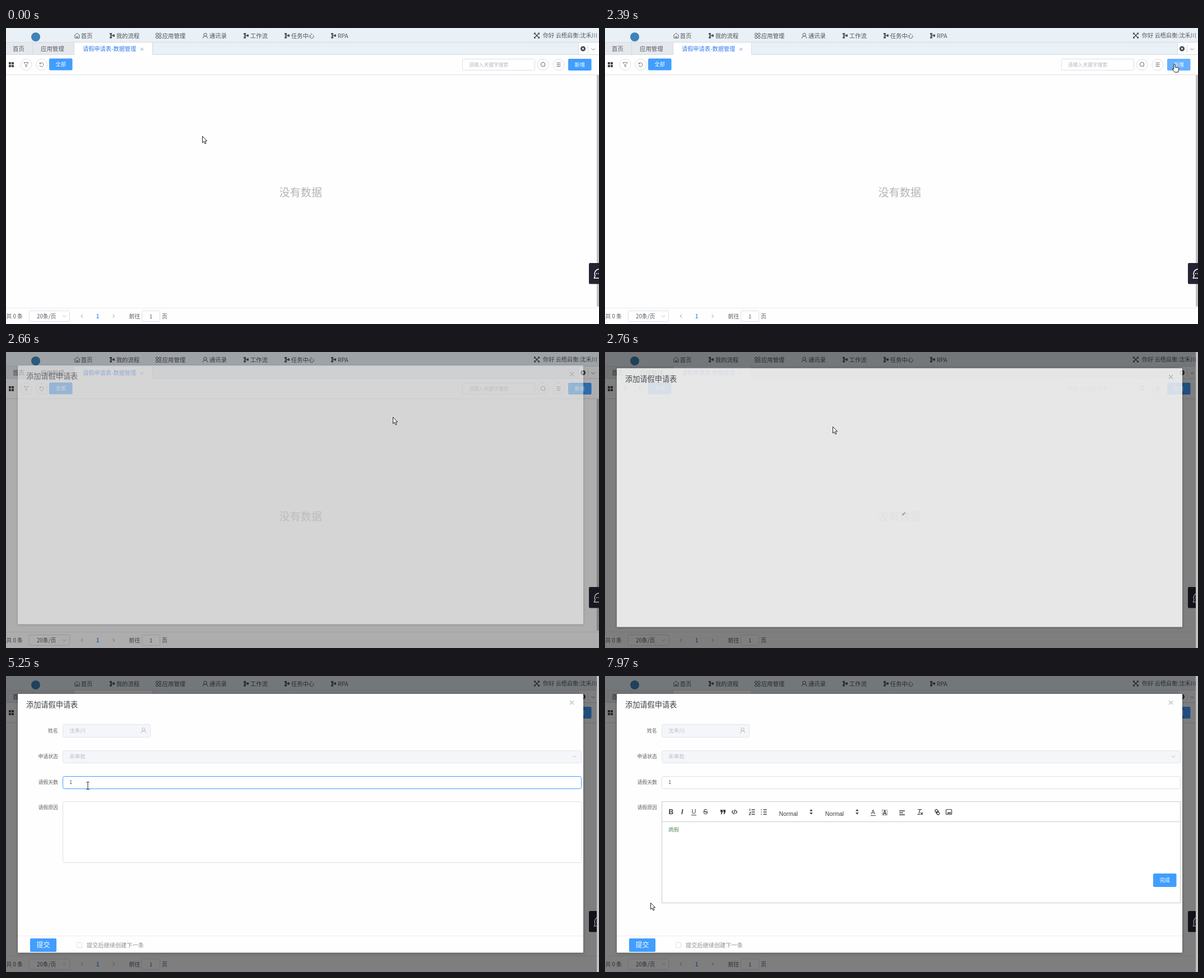
Recreate the animation shown at these times as an HTML page. Size 1058x529 px, loop 8 s.

```html
<!DOCTYPE html>
<html lang="zh-CN">
<head>
<meta charset="utf-8">
<title>请假申请表</title>
<style>
html, body { margin: 0; width: 100%; height: 100%; overflow: hidden; background: #fefefe; }
svg { display: block; width: 1058px; height: 529px; }
text { font-family: "Noto Sans CJK SC", "Noto Sans CJK JP", "Noto Sans CJK", sans-serif; white-space: pre; }
.latin { font-family: "Liberation Sans", Arial, sans-serif; }
.mono { font-family: "Liberation Mono", "Noto Sans CJK SC", "Noto Sans CJK JP", monospace; }
.item { color: #4f545c; }
.item .bg { fill: none; }
.item.on { color: #2f7bf0; }
.item.on .bg { fill: #f4f8fb; }
</style>
</head>
<body>
<svg id="stage" viewBox="0 0 1058 529"></svg>
<script>
const LOOP = 8000, BLUE = '#409eff', LINE = '#dcdfe6', INK = '#555a61';
const USER = '沈禾川', COMPANY = '云梧启衡';

// ---- drawing helpers
const text = (x, mid, str, size = 10.4, fill = INK, more = '') =>
  `<text x="${x}" y="${mid + size * .36}" font-size="${size}" fill="${fill}" ${more}>${str}</text>`;
const latin = (x, mid, str, size, fill, more = '') => text(x, mid, str, size, fill, `class="latin" ${more}`);
const rect = (x, y, w, h, fill, more = '') =>
  `<rect x="${x}" y="${y}" width="${w}" height="${h}" fill="${fill}" ${more}/>`;
const box = (x, y, w, h, fill = '#fff', stroke = LINE, more = 'rx="3"') =>
  rect(x + .5, y + .5, w - 1, h - 1, fill, `stroke="${stroke}" ${more}`);
const path = (d, stroke = INK, width = 1, fill = 'none') =>
  `<path d="${d}" stroke="${stroke}" stroke-width="${width}" fill="${fill}"/>`;
const ring = (x, y, r, stroke = LINE, fill = 'none', width = 1) =>
  `<circle cx="${x}" cy="${y}" r="${r}" stroke="${stroke}" fill="${fill}" stroke-width="${width}"/>`;
const button = (x, y, w, h, str, size = 9.2, more = '') => rect(x, y, w, h, BLUE, `rx="2" ${more}`) +
  text(x + w / 2, y + h / 2, str, size, '#fff', 'text-anchor="middle" font-weight="500"');
const chevron = (x, y, c = '#b8bcc4') => path(`M${x - 3} ${y - 1.5}l3 3 3-3`, c);
const group = (id, body) => `<g id="${id}">${body}</g>`;

const icons = {
  home: x => path(`M${x} 13.5l5-4.3 5 4.3M${x + 1} 13v5h8v-5M${x + 4} 18v-3h2v3`, 'currentColor', .9),
  flow: x => path(`M${x} 9h4v3h-4zM${x + 1} 12.5h3v2.5h-3zM${x} 15.5h4v3h-4zM${x + 5.5} 11.5h3.5v4h-3.5zM${x + 3} 13h3v1h-3z`, 'none', 0, 'currentColor'),
  apps: x => [[0, 0], [5.4, 0], [0, 5.4], [5.4, 5.4]].map(([a, b]) => ring(x + 2.5 + a, 11.2 + b, 2.1, 'currentColor')).join(''),
  user: (x, y = 14, c = 'currentColor') => ring(x + 4.5, y - 2, 2.7, c) + path(`M${x} ${y + 4.5}q.5-4 4.5-4t4.5 4`, c)
};

// ---- page
const menu = [
  ['首页', 'home', 122, 106], ['我的流程', 'flow', 185, 169], ['应用管理', 'apps', 267, 253],
  ['通讯录', 'user', 351, 337], ['工作流', 'flow', 424, 409], ['任务中心', 'flow', 497, 483], ['RPA', 'flow', 580, 566]
];
const menuEnd = i => i < menu.length - 1 ? menu[i + 1][3] : 628;
const menuItem = ([label, icon, x, left], i) =>
  `<g class="item"><rect class="bg" x="${left}" y="0" width="${menuEnd(i) - left}" height="25"/>` +
  icons[icon](x) + text(x + 11.7, 14, label, 10.4, 'currentColor') + '</g>';

const expand = path('M942.5 9l9 9M951.5 9l-9 9', '#44484e', 1.3) +
  path('M942 8.5h3.5l-3.5 3.5zM952 8.5v3.5l-3.5-3.5zM942 18.5v-3.5l3.5 3.5zM952 18.5h-3.5l3.5-3.5z', 'none', 0, '#44484e');

const header = rect(0, 0, 1058, 48, '#e9f0f6') + ring(53, 16, 8, 'none', '#3f83b8') +
  menu.map(menuItem).join('') + expand +
  text(958, 13.5, `你好 ${COMPANY}:${USER}`, 10.2) +
  rect(0, 26, 122, 22, '#e5e9ee') + path('M0 25.5H1058M0 47.5H122M261 47.5H1058M47.5 26v22M121.5 26v22', '#d5dae1') +
  rect(122, 26, 139, 23, '#fff') + path('M261.5 26v22', '#d5dae1') +
  text(12, 37, '首页') + text(62, 37, '应用管理') + text(137, 37, '请假申请表-数据管理', 10.2, '#2f7bf0') +
  path('M240 35.5l5 5M245 35.5l-5 5', '#5b8fd8', .9) +
  rect(1021, 26, 37, 21, '#fdfdfd') + path('M1021.5 26v22M1038.5 30v14', '#d8dce5') +
  ring(1029.5, 37, 4.5, 'none', '#3f444b') + path('M1027.8 35.3l3.4 3.4M1031.2 35.3l-3.4 3.4', '#fff', 1.1) +
  chevron(1047.5, 38, '#777');

const toolbar = [[5, 61], [10, 61], [5, 66], [10, 66]].map(([x, y]) => rect(x, y, 4, 4, '#43474d')).join('') +
  [36, 63.5, 958, 986].map(x => ring(x, 65.5, 10)).join('') +
  path('M32 61.5h8l-3 4v4l-2-1v-3z', '#777', .9) +
  path('M60.6 63.6a3.5 3.5 0 1 1-.5 3.2M60.2 61.6v2.4h2.5', '#666', .9) +
  button(77, 54.5, 41.5, 21, '全部') +
  box(814, 55, 130, 21, '#fff', LINE, 'rx="2"') + text(826, 65.5, '请输入关键字搜索', 8.8, '#b4b8c0') +
  ring(958, 65, 3.7, '#666') + path('M960.6 67.8l1.4 1.4', '#666') +
  path('M982.5 62.5h7M982.5 65.5h7M982.5 68.5h7', '#666') +
  button(1003, 55, 41.5, 21, '新增', 9.2, 'id="add"') +
  path('M0 83.5H1058', LINE);

const footer = path('M0 500.5H1058', '#e9ebee') + text(.5, 515, '共 0 条', 9.8) +
  box(41, 505, 73, 20, '#fff', LINE, 'rx="2"') + text(55, 515, '20条/页', 9.8) + chevron(104, 515) +
  path('M137 512l-3 3 3 3M190.5 512l3 3-3 3', '#999') + text(160.8, 515, '1', 9.8, BLUE, 'font-weight="700"') +
  text(219.5, 515.5, '前往', 10) + box(242, 505, 33, 20, '#fff', LINE, 'rx="2"') +
  text(256, 515.5, '1', 9.6) + text(278, 515.5, '页', 10);

const chat = rect(1040, 420, 22, 37.5, '#232331', 'rx="2"') +
  path('M1049.5 447l1.5-4.5a8 8 0 1 1 6.500 4.500z', '#fff', 1.6) +
  ring(1054, 439, 1, 'none', '#fff') + ring(1057.6, 439, 1, 'none', '#fff');

const page = rect(0, 0, 1058, 529, '#fefefe') + header + toolbar + text(487.5, 294, '没有数据', 19.1, '#b3b3b3') +
  footer + rect(1054, 84, 4, 414, '#c1c1c1', 'rx="1"') + chat;

// ---- dialog
const label = (x, y, str) => text(x, y, str, 8.9, '#606266');
const form = label(75, 98, '姓名') + box(101, 86, 157, 24, '#f4f6f9', '#e1e5ec') + text(113, 98, USER, 9.6, '#b9bdc5') +
  icons.user(241, 97.5, '#b4b8c0') +
  label(57.5, 144, '申请状态') + box(101, 133, 926, 23, '#f4f6f9', '#e1e5ec') + text(113, 144, '未审批', 9.6, '#b9bdc5') + chevron(1014, 144) +
  label(57.5, 189.5, '请假天数') + box(101, 179, 926, 23, '#fff', LINE, 'rx="3" id="days"') + text(113, 190, '0', 9.6, INK, 'id="count"') +
  rect(118, 184, 1, 11, '#333', 'id="caret"') +
  label(57.5, 235, '请假原因') + group('area', box(101, 224, 927, 110)) +
  path('M21 464.5H1030', '#ebedf0') + button(43, 469, 47, 24, '提交', 12) +
  box(126, 476, 10, 10, '#fff', LINE, 'rx="1"') + text(144, 481, '提交后继续创建下一条', 10.2, '#8c8f95');

const DARK = '#3c3c3c';
const sorter = x => path(`M${x} 241.5l2.8-3.5 2.8 3.5zM${x} 244l2.8 3.5 2.8-3.5z`, 'none', 0, DARK);
const quote = x => `M${x} 239h4v4l-2 4h-1.5l1-4h-1.5z`;
const chain = (x, y) => rect(x, y, 6, 4.5, 'none', `rx="2" stroke="${DARK}" stroke-width="1.3"`);
const tools = latin(113.5, 243, 'B', 12, DARK, 'font-weight="700"') +
  latin(136, 243, 'I', 12, DARK, 'font-weight="700" font-style="italic"') +
  latin(154.6, 242, 'U', 11, DARK) + path('M154 248.5h9', DARK) +
  latin(175.3, 243, 'S', 12, DARK) + path('M174.5 243h9.5', DARK) +
  path(quote(206) + quote(211), 'none', 0, DARK) +
  path('M229 240l-2.5 3 2.5 3M233 240l2.5 3-2.5 3M232 238.5l-2 9', DARK, 1.2) +
  path('M261.5 239h6M261.5 243h6M261.5 247h6M282.5 239h6M282.5 243h6M282.5 247h6', DARK, 1.4) +
  path('M258.5 237v4M257.5 244h2.5l-2.5 4h2.5M278 239h2M278 243h2M278 247h2', DARK, 1.1) +
  latin(310.5, 246, 'Normal', 10.4, DARK) + sorter(365) + latin(392.7, 246, 'Normal', 10.4, DARK) + sorter(447) +
  latin(474.8, 243.5, 'A', 10.5, DARK) + path('M474 249.5h9', DARK) +
  rect(494.5, 239.5, 9, 9, 'none', `stroke="${DARK}" stroke-dasharray="1.2 1"`) + latin(495.6, 244.3, 'A', 10, DARK, 'font-weight="700"') +
  path('M525 241h10M525 244.5h7M525 248h10', DARK, 1.3) +
  path('M558 238.5h7.5M562 238.5l-2 8M557 247.5h5M563 244l4 4M567 244l-4 4', DARK, 1.2) +
  `<g transform="rotate(45 593 243)">${chain(588, 240.5)}${chain(592, 241.5)}</g>` +
  rect(608.5, 238.5, 10, 9, 'none', `rx="1" stroke="${DARK}" stroke-width="1.2"`) +
  path('M610 246l2.5-3 2 1.5 1.5-2 1.5 3.5z', 'none', 0, DARK);

const editor = box(101, 224, 926, 182, '#fff', '#c8cacd', '') + path('M101 260.5H1027', '#c8cacd') + tools +
  text(114, 275, '书写你的内容', 9.4, '#777', 'id="hint" font-style="italic"') +
  text(113, 275, '病假', 9.6, '#5a8f62', 'id="reason"') +
  button(978, 353, 41.5, 24, '完成');

const dialog = rect(21, 32, 1009, 462.5, '#fefefe', 'rx="1" style="filter:drop-shadow(0 1px 2px rgba(0,0,0,.35))"') +
  text(36, 51.5, '添加请假申请表', 13.2, '#3d4046') + path('M1006 44l7 7M1013 44l-7 7', '#8c9097') +
  group('spin', path('M530.5 294.5l5-4.5', '#777', 1.4)) + group('form', form) + group('editor', editor);

// ---- mouse pointers, hot spot at 0,0
const arrow = path('M.5 .5v11.5l2.6-2.4 2 4.4 1.9-.9-2-4.2h3.6z', '#222', 1, '#fff');
const hand = path('M-1.2 1q1.2-2 2.4 0v5l5 1q1.5.5 1.3 2.5l-1 5.5h-6l-4-5q-.5-2 1.3-1l1 1z', '#222', 1, '#fff');
const beam = path('M-2.5-6.5h2l.5.5.5-.5h2M0-6v12M-2.5 6.5h2l.5-.5.5.5h2', '#222');
const deny = ring(0, 0, 4.8, '#c8252d', '#fff', 1.7) + path('M-3.4-3.4l6.8 6.8', '#c8252d', 1.7);
const pointers = { arrow, hand, beam, deny };

const stage = document.getElementById('stage');
stage.innerHTML = page + rect(0, 0, 1058, 529, '#000', 'id="veil"') + rect(1054, 0, 4, 529, '#c1c1c1', 'id="bar"') +
  group('dialog', dialog) + group('ime', '') +
  group('mouse', Object.entries(pointers).map(([k, v]) => group(k, v)).join(''));
const $ = id => document.getElementById(id);
const show = (id, on) => $(id).setAttribute('display', on ? 'inline' : 'none');
const items = [...document.querySelectorAll('.item')];

// ---- timing: bursts of screen updates [from, to, count]
const bursts = [
  [70, 820, 10], [900, 1660, 11], [1750, 2220, 7], [2390, 2840, 6], [2980, 3710, 10], [3800, 4260, 6],
  [4620, 4620, 1], [4790, 4790, 1], [5250, 5420, 3], [5560, 5890, 5], [6410, 6580, 3], [6730, 6810, 2],
  [6970, 7200, 4], [7730, 7970, 4]
];
function snap(t) {
  let s = 0;
  for (const [a, b, n] of bursts) {
    if (t < a) break;
    const step = (b - a) / (n - 1);
    s = t >= b ? b : a + Math.floor((t - a) / step) * step;
  }
  return s;
}

const route = [
  [0, 350, 193], [70, 345, 191], [350, 258, 132], [650, 180, 58], [820, 161, 20], [900, 178, 18], [1128, 211, 24],
  [1300, 330, 62], [1500, 650, 109], [1660, 880, 92], [1750, 925, 84], [2000, 1006, 65], [2220, 1020, 62],
  [2390, 1016, 64], [2480, 980, 76], [2570, 899, 95], [2660, 690, 116], [2750, 406, 133], [2840, 270, 140],
  [3300, 150, 146], [3710, 146, 146], [3800, 146, 150], [4030, 149, 186], [4260, 147, 190], [5250, 146, 196],
  [5420, 142, 272], [5560, 142, 270], [5890, 142, 267], [7650, 142, 267], [7730, 139, 282], [7970, 81, 405]
];
function place(t) {
  const i = Math.max(1, route.findIndex(p => p[0] >= t));
  const [a, x, y] = route[i - 1], [b, u, v] = route[i], k = (t - a) / (b - a);
  return [x + (u - x) * k, y + (v - y) * k];
}

const last = (table, t) => table.filter(r => r[0] <= t).pop();
// time, shift, dialog opacity, veil opacity
const fade = [[0, 0, 0, 0], [2570, -13, .11, .11], [2660, -8, .5, .32], [2750, -3, .82, .5], [2840, 0, 1, .5]];

// time, typed letters, candidates
const typing = [
  [0, '', ''], [6410, 'b', '吧 表 并 被 办 把 不 别 变'], [6495, 'bi', '比 笔 必 闭 币 毕 避 鼻 壁'],
  [6580, 'bin', '宾 滨 彬 斌 缤 濒 鬓 殡 槟'], [6730, 'bing', '病 并 冰 兵 饼 丙 柄 秉 禀'],
  [6810, "bing'j", '病假 并将 病句 并进 冰晶 并 病 冰'], [6970, "bing'ji", '病假 病急 并及 兵级 冰机 并际 病机 病 并'],
  [7040, "bing'jia", '病假 并加 冰架 并佳 兵甲 病家 饼家 病 并'], [7200, '', '']
];
let shown = '';
function drawIme([, letters, words]) {
  if (letters === shown) return;
  shown = letters;
  const ime = $('ime');
  if (!letters) { ime.innerHTML = ''; return; }
  let x = 120.5;
  const list = words.split(' ').map((w, i) => {
    const at = x;
    x += 21 + 12 * w.length;
    const c = i ? '#1c86d6' : '#e0262c';
    return text(at, 311, `${i + 1}.`, 10, c, 'class="mono"') + text(at + 12, 311, w, 12, c);
  }).join('');
  const end = x + 43;
  ime.innerHTML = box(113, 280, end - 113, 41, '#fcfdfe', '#a9bfd6', '') + path(`M116 300.5H${end - 24}`, '#dce4ee') +
    latin(121, 291, letters, 12, '#1c62b8', 'font-weight="700"') + list +
    box(x - 1, 304, 10, 13, '#fff', '#d5e0ec', '') + box(x + 9, 304, 11, 13, '#fff', '#c2d6ea', '') +
    path(`M${x + 5.5} 308v5l-3-2.5z`, 'none', 0, '#9aa9b8') + path(`M${x + 13} 308v5l3-2.5z`, 'none', 0, '#1c86d6') +
    rect(end - 22, 282, 20, 20, '#e77b5c');
  const typed = ime.querySelector('.latin').getComputedTextLength();
  ime.innerHTML += rect(121.5 + typed, 284, 1, 14, '#e0262c');
}

function render(t) {
  const s = snap(t), [x, y] = place(s);
  const inside = (l, tp, r, b) => x >= l && x < r && y >= tp && y < b;
  const [, shift, alpha, veil] = last(fade, s);
  const open = alpha > 0, ready = s >= 3060, editing = s >= 5640, done = s >= 7200;

  items.forEach((el, i) => el.classList.toggle('on', !open && inside(menu[i][3], 0, menuEnd(i), 26)));
  const onAdd = !open && inside(1003, 55, 1044, 76);
  $('add').setAttribute('fill', onAdd ? '#66b1ff' : BLUE);

  $('veil').setAttribute('opacity', veil);
  show('bar', s >= 2750);
  show('dialog', open);
  $('dialog').setAttribute('opacity', alpha);
  $('dialog').setAttribute('transform', `translate(0 ${shift})`);
  show('spin', s >= 2750 && !ready);
  show('form', ready);
  show('area', !editing);
  show('editor', editing);
  show('hint', !done);
  show('reason', done);

  const focus = s >= 4168 && s < 5560;
  $('days').setAttribute('stroke', focus ? BLUE : LINE);
  show('caret', focus && !(s >= 4620 && s < 4790) && s < 5250);
  $('count').textContent = s < 4790 ? '0' : '1';
  drawIme(last(typing, t));

  let kind = 'arrow';
  if (ready && (inside(101, 133, 1027, 156) || inside(101, 86, 258, 110))) kind = 'deny';
  else if (ready && (inside(101, 179, 1027, 202) || inside(101, 224, 1027, editing ? 406 : 334))) kind = 'beam';
  else if (!open && (onAdd || inside(106, 0, 628, 26) || inside(0, 26, 261, 48))) kind = 'hand';
  for (const k in pointers) show(k, k === kind);
  $('mouse').setAttribute('transform', `translate(${Math.round(x)} ${Math.round(y)})`);
}

const start = performance.now();
function tick() {
  render((performance.now() - start) % LOOP);
  requestAnimationFrame(tick);
}
tick();
</script>
</body>
</html>
```
